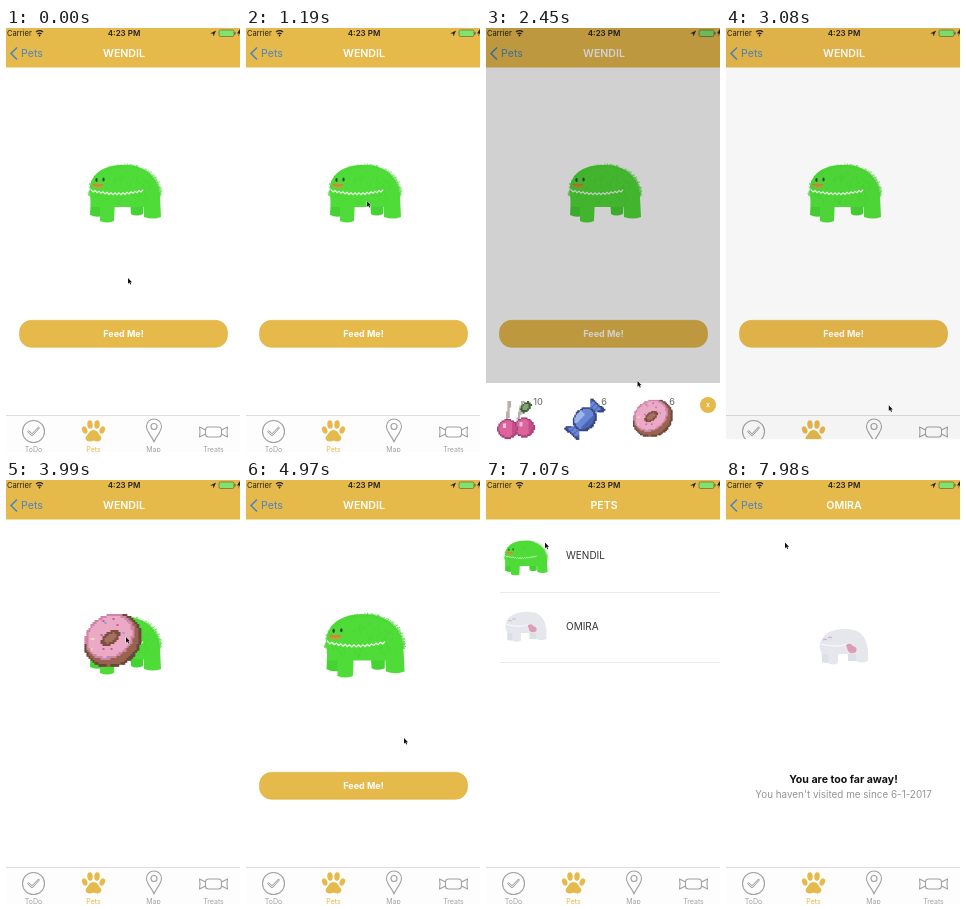
Write an HTML page with a canvas that moves like this. It is 234 px wide and 424 px high and loops after 8000 ms.

```html
<!DOCTYPE html>
<html lang="en">
<head>
<meta charset="utf-8">
<title>Pet feeding</title>
<style>
  html, body { margin: 0; width: 100%; height: 100%; overflow: hidden; background: #fff }
  canvas { display: block; width: 234px; height: 424px }
</style>
</head>
<body>
<canvas id="stage"></canvas>
<script>
const W = 234, H = 424, LOOP = 8000;
const GOLD = '#e6b94b', GREY = '#a3a09e', BLUE = '#4a86bd';
const stage = document.getElementById('stage');
const dpr = window.devicePixelRatio || 1;
stage.width = W * dpr;
stage.height = H * dpr;
const c = stage.getContext('2d');

const clamp = v => Math.max(0, Math.min(1, v));
const ease = v => v * v * (3 - 2 * v);
const ramp = (t, a, b) => ease(clamp((t - a) / (b - a)));
const noise = n => { const s = Math.sin(n * 127.1) * 43758.5453; return s - Math.floor(s); };

// Position along [time, x, y] keys
function along(keys, t) {
  let i = 0;
  while (i < keys.length - 2 && t > keys[i + 1][0]) i++;
  const [a, b] = [keys[i], keys[i + 1]], k = ramp(t, a[0], b[0]);
  return [a[1] + (b[1] - a[1]) * k, a[2] + (b[2] - a[2]) * k];
}

const POINTER = [
  [0, 122, 250], [500, 122, 250], [1120, 121, 173], [1320, 121, 173], [1850, 118, 305],
  [2080, 118, 305], [2450, 151.5, 353], [2780, 167, 388], [3000, 167, 388], [3380, 131, 297],
  [3480, 131, 297], [3960, 120, 157], [4300, 120, 157], [4900, 158, 258], [5350, 158, 258],
  [6200, 22, 25], [6500, 22, 25], [7000, 59, 62.5], [8000, 59, 62.5]
];

function at(x, y, scale, draw) {
  c.save();
  c.translate(x, y);
  c.scale(scale, scale);
  draw();
  c.restore();
}
function fill(color, path) {
  c.fillStyle = color;
  c.fill(new Path2D(path));
}
function line(color, width, path) {
  c.strokeStyle = color;
  c.lineWidth = width;
  c.stroke(new Path2D(path));
}
function oval(color, x, y, rx, ry = rx, turn = 0) {
  c.fillStyle = color;
  c.beginPath();
  c.ellipse(x, y, rx, ry, turn, 0, 7);
  c.fill();
}
function rect(color, x, y, w, h) {
  c.fillStyle = color;
  c.fillRect(x, y, w, h);
}
function text(s, x, y, size, color, weight = 400, align = 'center') {
  c.font = `${weight} ${size}px Inter, Roboto, sans-serif`;
  c.fillStyle = color;
  c.textAlign = align;
  c.textBaseline = 'middle';
  c.fillText(s, x, y);
}

// Pixel-art sprite: paint(u, v) gives the colour of a cell, or nothing.
// Cells overlap so that no seams show.
function pixels(x, y, cell, n, paint) {
  at(x, y, cell, () => {
    for (let v = -n; v < n; v++) for (let u = -n; u < n; u++) {
      const color = paint(u + .5, v + .5);
      if (color) rect(color, u, v, 1.4, 1.4);
    }
  });
}
function tilted(u, v, angle) {
  const p = Math.cos(angle), q = Math.sin(angle);
  return [u * p + v * q, v * p - u * q];
}
function ring(u, v, rx, ry) {
  const [a, b] = tilted(u, v, -.6);
  return Math.hypot(a / rx, b / ry);
}
function donut(x, y, size) {
  pixels(x, y, size / 28, 15, (u, v) => {
    const edge = ring(u, v, 14.8, 12.8);
    if (edge > 1) return;
    const hole = ring(u + 1, v + 1, 5.6, 3);
    if (hole < 1) return hole < .65 ? '#a5705c' : '#7d4f42';
    const icing = ring(u + 1.4, v + 1.7, 13, 10.6);
    if (icing < 1) {
      const n = noise(u * 7.31 + v * 3.77);
      if (n > .94 && icing < .9) return ['#7ea5cf', '#f0d9a5', '#c85a98'][Math.floor(n * 400) % 3];
      return icing > .9 ? '#cf85a6' : '#eba9c6';
    }
    return edge > .93 ? '#6b473b' : '#98634f';
  });
}
function candy(x, y) {
  pixels(x, y, 1.45, 14, (u, v) => {
    const [a, b] = tilted(u, v, -.85), body = Math.hypot(a / 8.8, b / 7.2);
    if (body < 1) return body > .86 ? '#35447f' : b < -2 && a < 3 ? '#9db5ee' : b > 2.5 ? '#4a63b3' : '#6986d6';
    const d = Math.abs(a), reach = (d - 5) * .8;
    if (d > 7 && d < 14 && Math.abs(b) < reach)
      return d > 13 || Math.abs(b) > reach - 1 ? '#35447f' : Math.floor(b + 20) % 3 ? '#6986d6' : '#4a63b3';
  });
}
function cherries(x, y) {
  pixels(x, y, 1.5, 14, (u, v) => {
    for (const [cx, cy] of [[-5, 6.5], [6, 5.5]]) {
      const d = Math.hypot((u - cx) / 1.08, v - cy);
      if (d < 6.3) return d > 5.4 ? '#a5447a' : Math.hypot(u - cx + 2, v - cy + 2) < 1.4 ? '#f6c5da' : u - cx > 2.5 ? '#c84c88' : '#dc649c';
    }
    const leaf = Math.hypot((u - 7 + v + 8) / 4, (u - 7 - v - 8) / 6);
    if (leaf < 1) return leaf > .7 ? '#43613f' : '#80a470';
    if (v > -12 && v < 0 && (Math.abs(u + 4 - (v + 10) * -.15) < .8 || Math.abs(u - 2 - v * -.25) < .8)) return '#b5b1ae';
  });
}

const DOME = 'M-35 0C-36 -18 -22 -27 -2 -27C20 -28 34 -14 35 4L35 15L-34 15Z';
function monster(x, y, scale) {
  at(x, y, scale, () => {
    const back = '#45d233', body = '#50dc38';
    fill(back, 'M-34 4L-24 4L-23 24Q-29 26 -35 23ZM5 7H18V22Q11 25 6 22Z');
    fill(body, DOME + 'M-25 5H-10L-11 29Q-18 32 -25 29ZM18 5H35L36 25Q28 28 19 25Z');
    for (let i = 0; i < 110; i++) {
      const a = Math.PI * (.95 + i / 100), r = 1 + noise(i) * .08;
      const px = Math.cos(a) * 35, py = Math.sin(a) * 27 + .5;
      line(i % 3 ? body : back, .8, `M${px * .94} ${py * .94}L${px * r} ${py * r}`);
    }
    for (let i = 0; i < 90; i++) {
      const px = -30 + noise(i + 200) * 60, py = -20 + noise(i + 400) * 30;
      if (Math.hypot(px / 34, (py - 2) / 25) < .9) line(back, .5, `M${px} ${py}l1 3`);
    }
    oval('#bda13a', -27, -6.5, 6, 2.6);
    line('#98802e', .6, 'M-32 -7.500Q-27 -6 -22 -7.500');
    oval('#294332', -28.5, -12, 1.1, 1.9);
    oval('#294332', -21.5, -12.5, 1.1, 1.9);
    let teeth = 'M-34 -2';
    for (let i = 0; i <= 26; i++) {
      const px = -34 + i * 2, arc = 3.2 * Math.sin(i / 26 * Math.PI);
      teeth += `L${px} ${-2.3 + arc + (i % 2 ? 1.8 : 0)}`;
    }
    line('#ecfbe8', 1.2, teeth);
  });
}
function paleMonster(x, y, scale) {
  at(x, y, scale, () => {
    fill('#dcdfe6', 'M-22 4H-12V15Q-17 17 -22 15ZM4 6H13V14H4Z');
    fill('#e5e7ed', 'M-24 -3C-22 -12 -14 -18 2 -18C18 -18 23 -8 24 4L24 14Q18 17 12 14L12 7L-6 7L-6 16Q-11 19 -16 16V7H-22Q-25 2 -24 -3Z');
    line('#fafafd', 1.2, 'M-23 -3Q-8 1 4 -3');
    line('#d3a3b5', 1, 'M-21 -7q2 -2 4 0M-16 -9q2 -2 4 0');
    fill('#dc9db4', 'M2 -2Q6 -5 9 -1Q14 0 12 5Q7 8 4 4Z');
  });
}

function statusBar(t) {
  text('Carrier', 1, 5.5, 7.6, '#222', 400, 'left');
  line('#222', 1.2, 'M30 4Q33.500 1.300 37 4M31.500 6Q33.500 4.300 35.500 6');
  oval('#222', 33.5, 7.5, .9);
  text('4:23 PM', 118, 5.5, 8, '#222', 600);
  if (t < 5700 || t > 6900) fill('#222', 'M204 5.500L210 2.500L207.500 8.500L207 5.500Z');
  c.beginPath();
  c.roundRect(213, 2, 15, 6.5, 1.5);
  c.fillStyle = '#83e26c';
  c.fill();
  c.strokeStyle = '#5a5434';
  c.lineWidth = .6;
  c.stroke();
  rect('#5a5434', 228.5, 4, 1, 2.5);
  fill('#222', 'M233.500 1.500L231 5.500H233L232 9L234 5V1.500Z');
}
function tabBar() {
  rect('#fdfdfd', 0, 387, W, 37);
  rect('#d3d1d0', 0, 387, W, .7);
  c.lineCap = c.lineJoin = 'round';
  at(27.5, 403.5, 1, () => {
    line(GREY, 1.1, 'M11 0A11 11 0 1 1 -11 0A11 11 0 1 1 11 0');
    line(GREY, 2.4, 'M-5 0L-1.500 3.500L5 -3.500');
    line('#fdfdfd', .8, 'M-5 0L-1.500 3.500L5 -3.500');
  });
  at(87.5, 403, 1, () => {
    oval(GOLD, -8.8, -1, 2.6, 3.7, -.4);
    oval(GOLD, 8.8, -1, 2.6, 3.7, .4);
    oval(GOLD, -3.5, -6.5, 2.7, 4.2, -.1);
    oval(GOLD, 3.5, -6.5, 2.7, 4.2, .1);
    fill(GOLD, 'M0 -1C4 -1 5 3 7 5C10 9 5 12 0 9.500C-5 12 -10 9 -7 5C-5 3 -4 -1 0 -1Z');
  });
  at(148, 403, 1, () => {
    line(GREY, 1.1, 'M0 11C-2 5 -7.500 1 -7.500 -4.500A7.500 7.500 0 0 1 7.500 -4.500C7.500 1 2 5 0 11ZM3 -4.500A3 3 0 1 1 -3 -4.500A3 3 0 1 1 3 -4.500');
  });
  at(207.5, 404, 1, () => {
    line(GREY, 1.1, 'M-8 -2Q-8 -5 -5 -5H5Q8 -5 8 -2V2Q8 5 5 5H-5Q-8 5 -8 2ZM-8 -2L-14 -5Q-13 0 -14 5L-8 2M8 -2L14 -5Q13 0 14 5L8 2');
  });
  ['ToDo', 'Pets', 'Map', 'Treats'].forEach((s, i) =>
    text(s, 27.5 + 60 * i, 421.8, 7, i === 1 ? GOLD : GREY));
  c.lineCap = 'butt';
  c.lineJoin = 'miter';
}

function title(s, dx, alpha, back) {
  c.globalAlpha = alpha;
  text(s, 118 + dx * .5, 25.5, 10.6, '#fff', 600);
  if (back) {
    line(BLUE, 1.6, 'M11 19.500L5 25.500L11 31.500');
    text('Pets', 15 + dx * .2, 25.8, 10.6, BLUE, 400, 'left');
  }
  c.globalAlpha = 1;
}
function feedButton() {
  c.beginPath();
  c.roundRect(13.5, 292.3, 208, 27, 12);
  c.fillStyle = GOLD;
  c.fill();
  c.strokeStyle = '#dfb044';
  c.lineWidth = .6;
  c.stroke();
  text('Feed Me!', 117.5, 306, 9, '#fff', 700);
}
function feedPage(t) {
  const feeding = t > 3150 && t < 4350;
  const grow = 1 + .1 * ramp(t, 4350, 4600);
  monster(119, 164, grow);
  if (!feeding) return feedButton();
  const [x, y] = along([[3150, 117, 300], [3480, 117, 300], [3960, 106.5, 160], [4350, 106.5, 160]], t);
  donut(x, y, 56);
}
function awayPage() {
  paleMonster(118, 167, 1);
  text('You are too far away!', 117.5, 299.5, 10.6, '#111', 700);
  text("You haven't visited me since 6-1-2017", 117.5, 315.3, 9.9, '#949494');
}
function listPage() {
  monster(40, 77, .6);
  text('WENDIL', 80, 76, 10, '#333', 400, 'left');
  paleMonster(40, 147, .85);
  text('OMIRA', 80, 147, 10, '#333', 400, 'left');
  for (const y of [112, 182]) rect('#ddd', 14, y, 220, .6);
}
function page(dx, draw) {
  if (Math.abs(dx) >= W) return;
  c.save();
  c.translate(dx, 0);
  rect('#fff', 0, 39, W, 348);
  draw();
  c.restore();
}

function sheet(t) {
  const open = ramp(t, 2080, 2380) * (1 - ramp(t, 2900, 3150));
  if (!open) return;
  rect(`rgba(0,0,0,${.18 * open})`, 0, 0, W, H);
  c.save();
  c.translate(0, 69 * (1 - open));
  rect('#fff', 0, 355, W, 69);
  cherries(29, 391);
  candy(98.5, 391);
  donut(166.5, 390, 39);
  [['10', 52], ['6', 118], ['6', 186]].forEach(([n, x]) => text(n, x, 374, 9, '#777', 500));
  oval(GOLD, 222, 377, 8);
  text('x', 222, 377, 7, '#fff', 600);
  c.restore();
}
function pointer(t) {
  const [x, y] = along(POINTER, t);
  at(x, y, .88, () => {
    const arrow = 'M0 0V6.400L1.500 5.100L2.600 7.500L3.700 7L2.600 4.700H4.600Z';
    line('#fff', 1, arrow);
    fill('#111', arrow);
  });
}

function draw(t) {
  c.setTransform(dpr, 0, 0, dpr, 0, 0);
  rect('#fff', 0, 0, W, H);
  const pop = ramp(t, 6400, 6780), push = ramp(t, 7330, 7700);
  page(-W * .3 * (1 - pop + push), listPage);
  if (pop < 1) page(W * pop, () => feedPage(t));
  if (push > 0) page(W * (1 - push), awayPage);
  rect(GOLD, 0, 0, W, 39.5);
  if (pop < 1) title('WENDIL', W * pop, 1 - pop, true);
  if (pop && push < 1) title('PETS', -W * .6 * (1 - pop + push), pop * (1 - push), false);
  if (push) title('OMIRA', W * (1 - push), push, true);
  statusBar(t);
  tabBar();
  sheet(t);
  pointer(t);
}

const start = performance.now();
function tick() {
  draw((performance.now() - start) % LOOP);
  requestAnimationFrame(tick);
}
tick();
</script>
</body>
</html>
```
